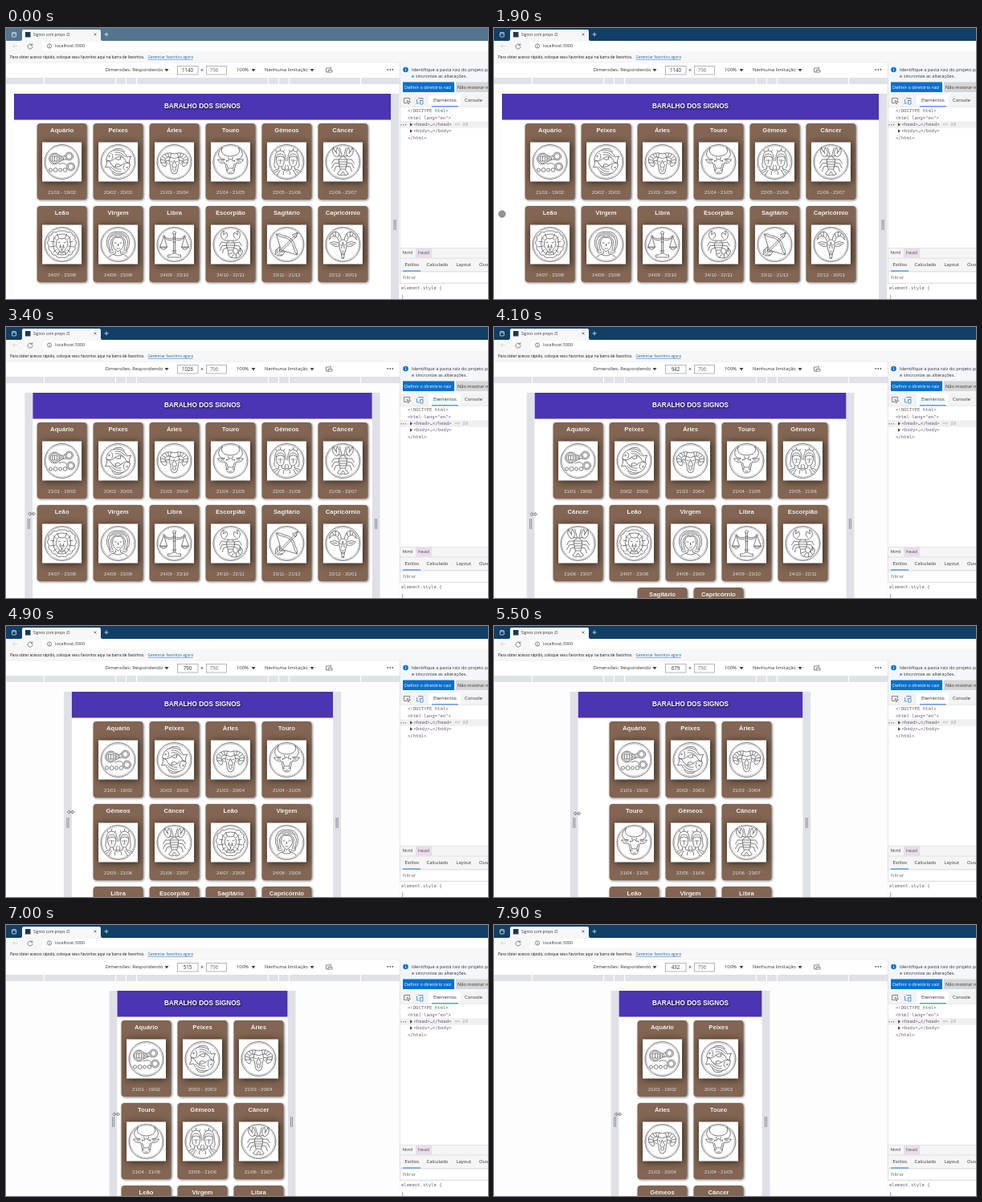
Recreate the animation shown at these times as an HTML page. Size 600x338 px, loop 8000 ms.

```html
<!DOCTYPE html>
<html lang="pt">
<head>
<meta charset="utf-8">
<style>
html, body { margin: 0; width: 600px; height: 338px; overflow: hidden; background: #fff; }
svg { display: block; }
text { font: 5.9px "Open Sans", sans-serif; fill: #333; white-space: pre; transform: translateY(-.4px); }
.small text, text.small { font-size: 4.77px; }
.info text { font-size: 5.7px; }
.mono text { font: 5.6px "DejaVu Sans Mono", monospace; fill: #666; }
.mono .tag { fill: #705a7c; }
.page text { font: bold 7.7px "Liberation Sans", Arial, sans-serif; fill: #fff; text-anchor: middle; filter: drop-shadow(.6px .6px .6px #0008); }
.page .title { font-size: 8.2px; filter: drop-shadow(1px 1px 1px #000b); }
.page .date { font-weight: normal; font-size: 5.93px; }
.card { filter: drop-shadow(1px 1px 1.8px #0008); }
.photo { filter: drop-shadow(1px 1.5px 4px #000a); }
.line { fill: none; stroke: #555; stroke-width: .7; }
.art { fill: none; stroke: #505050; stroke-width: .75; stroke-linejoin: round; }
.mid { text-anchor: middle; }
</style>
</head>
<body>
<svg width="600" height="338" viewBox="0 0 600 338">
  <rect width="600" height="338" fill="#fdfdfe"/>

  <!-- Browser window -->
  <rect id="bar" width="600" height="16"/>
  <g class="line" style="stroke:#fff">
    <rect x="7.5" y="5.5" width="5" height="5.5" rx="1"/>
    <path d="M7.5 7h5M122.5 8h5M125 5.5v5"/>
  </g>
  <path d="M18 16Q20 16 20 14V4Q20 2 22 2H116Q118 2 118 4V14Q118 16 120 16Z" fill="#f7f7f7"/>
  <rect x="24" y="5" width="6.5" height="6.5" fill="#20384f"/>
  <text class="small" x="34" y="10.4">Signos com props :D</text>
  <rect y="16" width="600" height="27" fill="#f7f7f7"/>
  <rect x="45" y="17.5" width="570" height="11" rx="2.5" fill="#fff"/>
  <path class="line" style="stroke:#ccc" d="M14 22.5H8.500M11 20l-2.500 2.500 2.500 2.500"/>
  <g class="line">
    <path d="M109.5 6.5l3 3M112.5 6.5l-3 3M32.3 21.2A3 3 0 1 0 33 23M32.8 19.5v2h-2"/>
    <circle cx="54" cy="22.5" r="2.6"/><path d="M54 22.1v2M54 20.8v.6"/>
  </g>
  <text x="61" y="24.7" style="font-size:5.5px">localhost:3000</text>
  <g class="small">
    <text x="5" y="38.4" style="fill:#111">Para obter acesso rápido, coloque seus favoritos aqui na barra de favoritos.</text>
    <text x="176.5" y="38.4" style="fill:#1464b4;text-decoration:underline">Gerenciar favoritos agora</text>
  </g>

  <!-- Device toolbar -->
  <rect y="43" width="490" height="19" fill="#fff"/>
  <path d="M0 43.2H600" stroke="#e3e3e3" stroke-width=".5"/>
  <g class="line" style="stroke:#999">
    <rect x="213.5" y="47.5" width="25.5" height="10.5"/>
    <rect x="249.5" y="47.5" width="25" height="10.5"/>
  </g>
  <text x="123.5" y="54.5">Dimensões: Respondendo</text>
  <text id="size" class="mid" x="226" y="55" style="font-size:6.2px"></text>
  <text class="mid" x="244" y="55.2" style="font-size:7px">×</text>
  <text class="mid" x="259" y="55" style="font-size:6.2px;fill:#777">796</text>
  <text x="287" y="54.5">100%</text>
  <text x="322" y="54.5">Nenhuma limitação</text>
  <path d="M197.5 51h5l-2.5 3.5zM305.5 51h5l-2.5 3.5zM378.5 51h5l-2.5 3.5z" fill="#444"/>
  <path class="line" d="M403 50h-4.5v5h3M401 52.5h5v2.500h-5zM403 48.500l2 1.500-2 1.500"/>
  <path d="M474.5 52h1.5m1.5 0h1.5m1.5 0h1.5" stroke="#444" stroke-width="1.3"/>
  <rect y="62" width="490" height="8" fill="#dfe2e7"/>
  <path d="M47.5 62v8M136.5 62v8M149.5 62v8M162.5 62v8M326.5 62v8M339.5 62v8M352.5 62v8M441.5 62v8" stroke="#fff" stroke-width="1.2"/>

  <!-- Resizable page -->
  <g class="page">
    <g id="frame"></g>
    <text class="title" x="244.5" y="100.8">BARALHO DOS SIGNOS</text>
    <g id="deck"></g>
  </g>

  <!-- Inspector -->
  <rect x="490" y="43.5" width="110" height="295" fill="#fff"/>
  <rect x="490" y="43.5" width="110" height="39.5" fill="#f3f7fb"/>
  <circle cx="497.5" cy="52" r="3.3" fill="#1470c8"/>
  <path d="M497.5 51.5v2.3M497.5 49.8v.8" stroke="#fff" stroke-width=".8"/>
  <g class="info">
    <text x="505" y="54.2">Identifique a pasta raiz do projeto para</text>
    <text x="505" y="62.2">e sincronize as alterações.</text>
  </g>
  <rect x="494" y="67.5" width="64" height="12.5" fill="#0a6fcd"/>
  <rect x="560" y="67.5" width="44" height="12.5" fill="#d6d6d6"/>
  <g class="info">
    <text x="496" y="76" style="fill:#fff">Definir o diretório raiz</text>
    <text x="562" y="76">Não mostrar novamente</text>
  </g>
  <rect x="490" y="83" width="110" height="15.5" fill="#f3f3f3"/>
  <rect x="526" y="83" width="40" height="15" fill="#fff"/>
  <g class="line">
    <path d="M499 93.5h-3.5v-6h7v3M499 90.5l4.5 1.8-2 .7-.8 2z"/>
    <path d="M514 94h-2.5v-5M513 87.5h6v2M515.5 90.5h3.5v4.5h-3.5z" style="stroke:#1a73d0"/>
  </g>
  <text x="532" y="92.5">Elementos</text>
  <text x="571" y="92.5">Console</text>
  <path d="M490 98.3h110" stroke="#ddd" stroke-width=".6"/>
  <path d="M530 97.8h33" stroke="#1a73d0"/>
  <rect x="490" y="116.3" width="110" height="8.5" fill="#f0f0f0"/>
  <path d="M503 118.3v4.5l3-2.25zM503 126.3v4.5l3-2.25z" fill="#444"/>
  <g class="mono">
    <text x="500" y="105.5">&lt;!DOCTYPE html&gt;</text>
    <text x="500" y="114" class="tag">&lt;html lang="en"&gt;</text>
    <path d="M491.5 120.8h1.2m1.5 0h1.2m1.5 0h1.2" stroke="#555"/>
    <text x="507.5" y="122.5" class="tag">&lt;head&gt;…&lt;/head&gt;</text>
    <text x="558.5" y="122.5" style="fill:#aaa;font-style:italic">== $0</text>
    <text x="507.5" y="130.5" class="tag">&lt;body&gt;…&lt;/body&gt;</text>
    <text x="500" y="139" class="tag">&lt;/html&gt;</text>
  </g>
  <rect x="490" y="274.5" width="110" height="44.5" fill="#f5f5f5"/>
  <rect x="510" y="275" width="20" height="11.5" fill="#e7dfe7"/>
  <text x="493.5" y="282.8">html</text>
  <text x="513" y="282.8" style="fill:#6a3f78">head</text>
  <path d="M490 274.5h110M490 287h110M490 303.5h110M490 318.5h110M490.3 43v295" stroke="#d3d3d3" stroke-width=".6"/>
  <text x="496.5" y="297.5">Estilos</text>
  <text x="523.5" y="297.5">Calculado</text>
  <text x="560.5" y="297.5">Layout</text>
  <text x="589" y="297.5">Ouvintes</text>
  <path d="M494 303h22" stroke="#1a73d0"/>
  <rect x="492" y="305.5" width="112" height="11.5" fill="#fff"/>
  <text x="494" y="313.8" style="fill:#666">Filtrar</text>
  <rect x="490" y="319" width="110" height="19" fill="#fff"/>
  <g class="mono"><text x="492" y="326.9">element.style {</text><text x="492" y="337.4">}</text></g>

  <circle id="dot" r="4.2" fill="#777c" stroke="#888" stroke-width=".8"/>
  <path id="arrows" d="M-4.5 0l2.5-2v1.3h4v-1.3l2.5 2-2.5 2v-1.3h-4v1.3z" fill="#fff" stroke="#444" stroke-width=".6"/>
</svg>
<script>
const $ = id => document.getElementById(id);
const SCALE = .4115, MID = 244.5, CARD = 170, FULL = 1140;
const ring = (x, y, r) => `M${x - r} ${y}a${r} ${r} 0 1 0 ${2 * r} 0a${r} ${r} 0 1 0 ${-2 * r} 0`;
const FLIP = 'scale(-1 1)', TURN = 'rotate(180)';

// name, dates, drawing, transform of its second copy, extra strokes
const signs = [
  ['Aquário', '21/01 - 19/02', ring(-9, -4, 7) + ring(-9, -4, 5.5) + ring(9, -7, 5) + ring(9, -7, 3.5) + ring(11, 6, 5) + ring(11, 6, 3.5) +
    ring(-14, 10, 2) + ring(-8, 10, 2.5) + ring(-2, 10, 2) + ring(4, 10, 2.3) +
    'M-12-7h6v6h-6zM-9-7v6M-3-8Q1-5 4-8M-3 0Q2-4 6-3M0-7v5M2-6v4M-4 3Q3 0 6 4'],
  ['Peixes', '20/02 - 20/03', 'M-15-3Q-13-14-3-15Q8-15 11-6L16-7Q13-2 14 2Q9 1 8-4Q2-9-4-4T-15-3M-9-11Q-5-8-8-3M-6-14Q-3-18 5-16L8-12M-4-12Q4-13 9-6M-4-9Q3-10 7-5M-4-5Q-1-1 3-3V-6' + ring(-11, -7, .8), TURN],
  ['Áries', '21/03 - 20/04', 'M0-10Q11-14 17-5Q18 4 11 6Q8 4 11 0Q13-4 8-6Q4-6 0-4M4-11 5-6M8-11 7-6M12-10 9-6M15-7 11-4M17-3 12-2M17 1 11 1M5-6Q8-1 5 4L4 11Q3 15 0 15M6-2 11-1 7 3M2 0 5-1M0 6Q2 7 2 10L0 12M3 3 2 7M0-2 2 3', FLIP],
  ['Touro', '21/04 - 21/05', 'M0-7Q5-7 8-9Q13-12 10-18Q18-11 13-5Q11-3 7-3L16-3Q13 3 7 1L5 9Q5 15 0 15M2-1 5-2 5 0M0 8Q4 7 4 11M2 11 3 10M3-6 2-2 0-4M5 2 3 8M0 13H2M8-1 12-1', FLIP],
  ['Gêmeos', '22/05 - 21/06', 'M3-4Q3-10 8-10T13-4Q13 5 8 6T3-4M1-1Q1-14 8-14T15-1Q17 4 14 8M8-14 8-17M4-12 3-15M12-12 14-15M3-5Q8-9 13-5M5-2h2M9-2h2M7 2h2M8-3V1M6 6V9Q2 9 0 12M10 6V9Q14 9 17 12M0 9Q5 11 4 16M8 10 12 17M10 10 15 14M1 4Q3 7 2 9', FLIP],
  ['Câncer', '21/06 - 23/07', 'M0-7Q6-6 5 1T3 10L7 15 3 17 0 16M2-7Q4-9 8-6Q15-10 12-18L9-12 7-18Q2-12 6-7M8-10 8-13M5-3 11-3 14 2M5 1 11 2 14 8M4 5 9 6 11 12M0-3H5M0 0H5M0 3H5M0 6H4M0 9H3M0 12 3 16M1-7 4-18M2-5H3', FLIP],
  ['Leão', '24/07 - 23/08', 'M0-7Q6-9 7-3T4 6Q4 10 0 11M0 3H3L0 6V8M2-2 5-3M0-17Q5-18 7-15Q12-17 13-12Q18-11 16-6Q20-2 16 2Q18 7 13 9Q13 14 8 13Q6 18 0 16M0-13Q8-13 10-7T10 5Q7 13 0 13M6-13 4-8M11-10 7-6M14-4 9-3M15 3 8 2M11 10 6 6M5 13 4 9M2 0 2 3M0 9H3', FLIP],
  ['Virgem', '24/08 - 23/09', 'M0-9Q6-10 7-3T0 9M0-16Q12-17 14-5Q15 2 11 7Q12 13 5 9M0-9Q5-13 9-4 9 3 7 8M0-12Q10-13 12-4Q12 2 9 9M2-2Q4-1 5-3M0 5H2M0-14Q7-15 11-9M3 8V11Q8 12 12 16M0-1V2M0 14Q4 14 6 12', FLIP],
  ['Libra', '24/09 - 23/10', 'M1-14V11M0-9Q6-5 13-10L9 3H18L13-10M9 3Q13 10 18 3M9 4H18M0 11H2Q3 14 8 13V16H0M0-17 2-15 1-12M0-7Q6-3 12-8M0 8H3M0-3H2M11-10Q13-13 15-10', FLIP],
  ['Escorpião', '24/10 - 22/11', 'M0-5Q6-4 5 2L3 8M2-5Q8-4 11-8Q14-15 8-17L9-12 5-15Q2-10 7-7M5-2 11-3 14 2M5 1 11 2 13 8M4 4 9 6 10 11M0-2H5M0 1H5M0 4H4M0 7H3', FLIP, 'M-3 8Q-4 17 5 17T15 8L12 4 11 8 13 9M3 8Q4 13 7 12L11 8M-2 12 3 10M1 16 4 12M7 17 7 12M12 14 9 10'],
  ['Sagitário', '23/11 - 21/12', 'M-13-13Q-8-14-4-11Q8-10 11 4Q14 8 13 13M-13-13Q-10-10-5-9Q6-8 9 5Q10 10 13 13M-13-13-7 7 13 13M-14 13 14-15M-12 14 13-11M14-15 7-12 11-8zM-14 13v-6l5-4v6M-12 14h6l4-5h-6M-12 10v-4M-9 13h4'],
  ['Capricórnio', '22/12 - 20/01', 'M0-6Q5-5 5 0L3 9Q2 13 0 13M2-6Q3-15 9-16Q16-15 17-6Q13-12 9-10Q6-9 5-4M5-14 6-9M9-16 9-10M13-14 11-10M5-2Q11-5 16-2Q11 4 5 2M7 0 13-1M2 1 4 0M0 9 2 8M0 11H2M2 12 1 18 0 16M0-3 2 5', FLIP]
];

$('deck').innerHTML = signs.map(([name, dates, art, copy, extra = '']) => `<g>
  <rect class="card" x="-31" width="62" height="95" rx="4" fill="#826552"/>
  <text y="11.6">${name}</text>
  <rect class="photo" x="-24.5" y="23.5" width="49" height="49" fill="#fff"/>
  <g class="art" transform="translate(0 48)">
    <circle r="21.5"/><circle r="20" stroke-dasharray="1.5 .6" stroke-width=".5"/>
    <path d="${art}${extra}"/>${copy ? `<path d="${art}" transform="${copy}"/>` : ''}
  </g>
  <text class="date" y="88">${dates}</text></g>`).join('');
const cards = [...$('deck').children];

// piecewise linear value from [time, value] points
function at(keys, t) {
  let i = 1;
  while (i < keys.length - 1 && t > keys[i][0]) i++;
  const [t0, a] = keys[i - 1], [t1, b] = keys[i];
  return a + (b - a) * Math.min(1, Math.max(0, (t - t0) / (t1 - t0)));
}
const widths = [[2400, FULL], [3300, 1038], [3400, 1026], [4100, 942], [4200, 926], [4900, 790],
  [5100, 731], [6000, 615], [6200, 606], [6900, 524], [7800, 440], [7900, 432]];
const heights = [[2400, 232], [4100, 233.5], [4900, 232], [6200, 236], [7900, 236]];
const dotX = [[600, 299], [1500, 21], [1900, 10]];
const dotY = [[600, 342], [1500, 233], [1900, 232]];

const strip = x => `<rect x="${x}" y="82" width="10" height="256" fill="#dfe1e7"/>
  <path d="M${x + 4} 239v13m2 0v-13" stroke="#8b8e94" fill="none"/>`;

function placeCards(width) {
  const cols = Math.floor(width / CARD);
  cards.forEach((card, i) => {
    const row = Math.floor(i / cols), count = Math.min(cols, cards.length - row * cols);
    const x = MID + (i % cols - (count - 1) / 2) * CARD * SCALE;
    card.setAttribute('transform', `translate(${x} ${119 + row * 103})`);
  });
}

function draw(t) {
  const width = Math.round(at(widths, t)), w = width * SCALE, left = MID - w / 2;
  const active = at([[300, 0], [500, 1]], t);
  const mix = (a, b) => Math.round(a + (b - a) * active);
  $('bar').setAttribute('fill', `rgb(${mix(84, 17)},${mix(117, 63)},${mix(143, 101)})`);
  $('size').textContent = width;
  // the left handle only shows once the page is narrower than its pane
  $('frame').innerHTML = (width < FULL ? strip(left - 10) : '') + strip(left + w) +
    `<rect x="${left}" y="82" width="${w}" height="256" fill="#fff"/>
     <rect x="${left}" y="82" width="${w}" height="32.5" fill="#4c34b2"/>`;
  placeCards(width);
  const dragging = t >= 2200;
  $('dot').setAttribute('visibility', t >= 600 && !dragging ? 'visible' : 'hidden');
  $('dot').setAttribute('transform', `translate(${at(dotX, t)} ${at(dotY, t)})`);
  $('arrows').setAttribute('visibility', dragging ? 'visible' : 'hidden');
  $('arrows').setAttribute('transform', `translate(${left - 1.3} ${at(heights, t)})`);
}

let last = -1;
function tick() {
  const t = Math.floor(performance.now() % 8000 / 100) * 100;
  if (t !== last) draw(last = t);
  requestAnimationFrame(tick);
}
tick();
</script>
</body>
</html>
```
